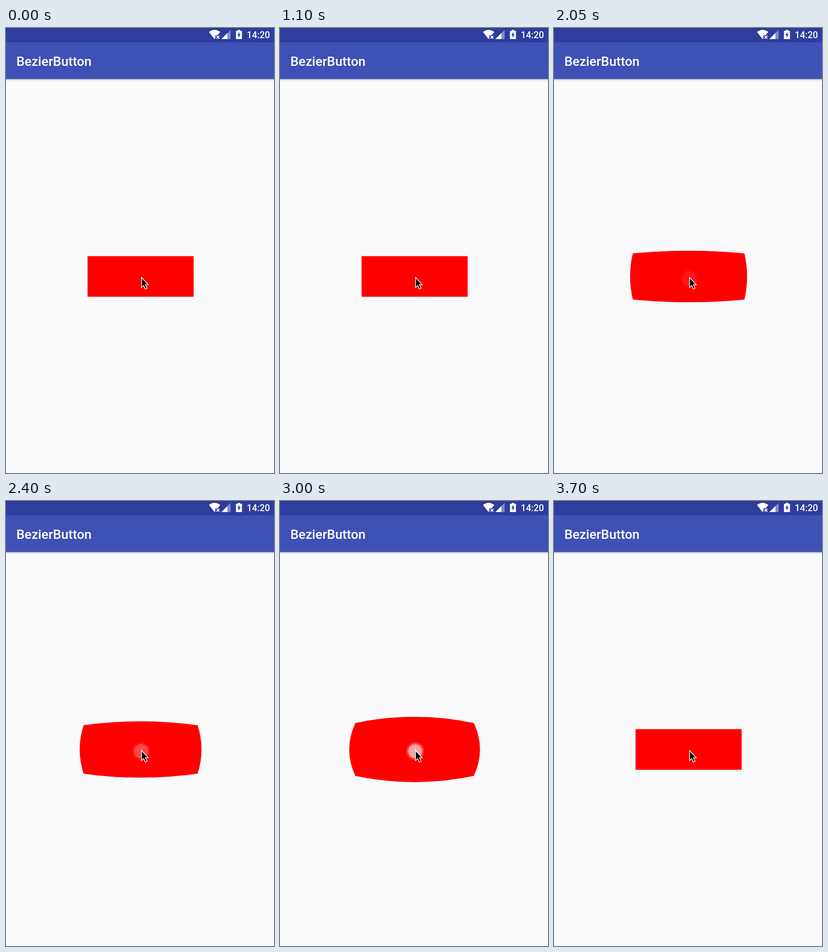
Write an HTML page that moves like this. It is 581x964 px and loops after 3750 ms.

```html
<!DOCTYPE html>
<html lang="en">
<head>
<meta charset="utf-8">
<title>BezierButton</title>
<style>
  html, body { margin: 0; width: 100%; height: 100%; overflow: hidden; background: #faf9fb; }
  svg { display: block; width: 581px; height: 964px; }
  text { font-family: Roboto, sans-serif; font-weight: 500; fill: #fff; }
</style>
</head>
<body>
<svg viewBox="0 0 581 964">
  <defs>
    <linearGradient id="shadow" x2="0" y2="1">
      <stop offset="0" stop-color="#000" stop-opacity=".32"/>
      <stop offset=".4" stop-color="#000" stop-opacity=".1"/>
      <stop offset="1" stop-color="#000" stop-opacity="0"/>
    </linearGradient>
    <linearGradient id="status" x2="0" y2="1">
      <stop offset="0" stop-color="#2e3a98"/>
      <stop offset=".3" stop-color="#303c9e"/>
    </linearGradient>
    <radialGradient id="glow">
      <stop offset=".68" stop-color="#fff" stop-opacity=".38"/>
      <stop offset="1" stop-color="#fff" stop-opacity="0"/>
    </radialGradient>
  </defs>

  <rect y="110" width="581" height="6" fill="url(#shadow)"/>
  <rect y="31" width="581" height="79.5" fill="#3f51b5"/>
  <rect width="581" height="31" fill="url(#status)"/>
  <text x="22.5" y="82" font-size="28.2">BezierButton</text>
  <text x="522" y="22" font-size="19.8">14:20</text>

  <g fill="#fff">
    <path d="M440 8.6Q452 -.4 464.5 8.6L459 15.6H454V21.5L452 24Z"/>
    <path d="M456.5 17L462.5 23M462.5 17L456.5 23" stroke="#fff" stroke-width="1.9"/>
    <path d="M467 24L487 4V24Z" opacity=".4"/>
    <path d="M467 24L480 11V24Z"/>
    <path d="M502.5 4H507.5V6H511.5V24H498.5V6H502.5Z"/>
    <path d="M506 8.5L501.5 15.5H504.3V21L508.7 13.7H506Z" fill="#303c9e"/>
  </g>

  <path id="button" fill="#f00"/>
  <g id="touch">
    <circle cx="293" cy="542" r="21" fill="url(#glow)"/>
    <circle cx="293" cy="542" r="15" fill="#fff" fill-opacity=".42"/>
  </g>
  <path d="M293.8 540.5V562L298.6 557.8L302 565.5L305.8 563.9L302.4 556.1H308.3Z" stroke="#fff" stroke-width="1.5"/>
</svg>
<script>
  const LOOP = 3750, STEP = 50;
  const LEFT = 176.8, TOP = 494.3, RIGHT = 406.8, BOTTOM = 582.2, GROWTH = 13.4;

  // [time in ms, pressure from 0 to 1], linear in between
  const presses = [
    [0, 0], [20, 0], [270, 1], [550, 1], [800, 0],
    [1420, 0], [1670, 1], [1905, 1], [2165, 0],
    [2230, 0], [2430, .75], [2650, 0],
    [2720, 0], [2960, 1], [3050, 1], [3270, 0],
    [3290, 0], [3490, .9], [3700, 0], [LOOP, 0]
  ];
  const button = document.getElementById('button');
  const touch = document.getElementById('touch');

  function pressure(time) {
    const i = presses.findIndex(([end]) => end > time);
    const [t0, p0] = presses[i - 1], [t1, p1] = presses[i];
    return p0 + (p1 - p0) * (time - t0) / (t1 - t0);
  }

  // Corners move out by d, the control points of the sides by 3d
  function buttonPath(d) {
    const l = LEFT - d, t = TOP - d, r = RIGHT + d, b = BOTTOM + d;
    const cx = (l + r) / 2, cy = (t + b) / 2, bulge = 2 * d;
    return `M${l} ${t}Q${cx} ${t - bulge} ${r} ${t}Q${r + bulge} ${cy} ${r} ${b}` +
      `Q${cx} ${b + bulge} ${l} ${b}Q${l - bulge} ${cy} ${l} ${t}Z`;
  }

  function draw() {
    const time = Math.floor(performance.now() % LOOP / STEP) * STEP;
    const p = pressure(time);
    button.setAttribute('d', buttonPath(p * GROWTH));
    touch.setAttribute('opacity', Math.max(0, (p - .35) / .65));
    requestAnimationFrame(draw);
  }
  draw();
</script>
</body>
</html>
```
